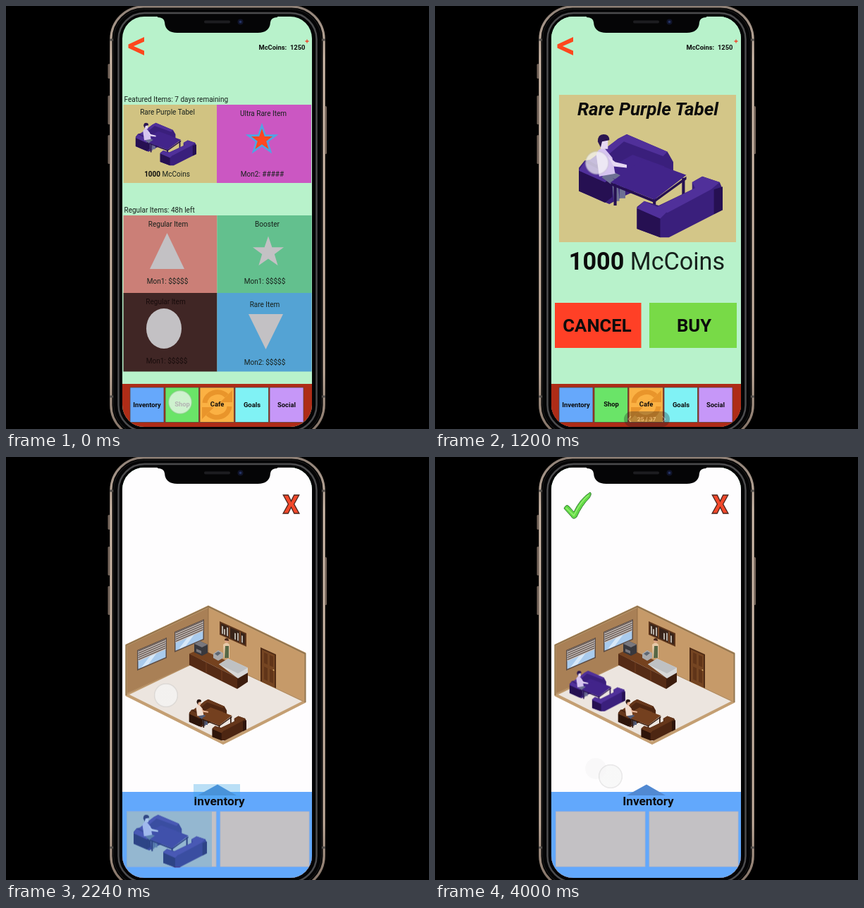
Animation, 600 px wide and 600 px high, one loop 4040 ms. Source, as an HTML page:

```html
<!DOCTYPE html>
<html lang="en">
<head>
<meta charset="utf-8">
<title>Cafe shop prototype</title>
<style>
  html, body { margin: 0; width: 100%; height: 100%; overflow: hidden; background: #000; }
  svg { display: block; width: 100vw; height: 100vh; }
  text { font-family: Roboto, "Liberation Sans", sans-serif; font-size: 10px; fill: #17211c; white-space: pre; }
  .b { font-weight: 700; fill: #0c0c0c; }
  .s { font-size: 9.4px; }
  .m { text-anchor: middle; }
  .big { font-size: 25.7px; }
  .dim text { fill: #180c0c; }
  .grey { fill: #c3c1c4; }

  .purple { --top: #42248a; --lit: #50309a; --mid: #3a1f7c; --dark: #261052; --skin: #e6d8f2; --shirt: #d6c4f0; --hair: #2b1650; --legs: #6d7093; }
  .brown { --top: #74401f; --lit: #66371b; --mid: #4d2612; --dark: #2e150a; --skin: #e8b596; --shirt: #f0ddd0; --hair: #2a1710; --legs: #4f5b78; }
  .top { fill: var(--top); } .lit { fill: var(--lit); } .mid { fill: var(--mid); } .dark { fill: var(--dark); }
  .skin { fill: var(--skin); } .shirt { fill: var(--shirt); } .hair { fill: var(--hair); }
  .legs { fill: none; stroke: var(--legs); stroke-width: 4; stroke-linejoin: round; }
  .post { fill: none; stroke: var(--dark); stroke-width: 2; }

  .a { animation: 4040ms linear infinite; }
  #popup { animation-name: popup; }
  #room { animation-name: room; }
  #stored { animation-name: stored; }
  #placed { animation-name: placed; }
  #hint { animation-name: hint; }
  #pager { animation-name: pager; }
  #touch { animation-name: touch; }
  #ghost { animation-name: ghost; }

  @keyframes popup { 0%, 26.73% { opacity: 0 } 29.7%, 100% { opacity: 1 } }
  @keyframes room { 0%, 33.66% { opacity: 0 } 37.62%, 100% { opacity: 1 } }
  @keyframes stored { 0%, 76.73% { opacity: 1 } 80.69%, 100% { opacity: 0 } }
  @keyframes placed { 0%, 76.73% { opacity: 0 } 80.69%, 100% { opacity: 1 } }
  @keyframes hint { 0%, 51.5% { opacity: 0 } 53.5%, 56.4% { opacity: .35 } 59.4%, 100% { opacity: 0 } }
  @keyframes pager { 0%, 6.93% { opacity: 0 } 8.91%, 27.7% { opacity: 1 } 30.7%, 100% { opacity: 0 } }
  @keyframes ghost { 0%, 98.02% { opacity: 0 } 98.8%, 100% { opacity: .3 } }
  @keyframes touch {
    0%, 1.98% { transform: translate(247px, 562px); animation-timing-function: ease-in-out }
    9.9%, 28.7% { transform: translate(215px, 194px); animation-timing-function: ease-in-out }
    33.17%, 37.62% { transform: translate(350px, 455px); animation-timing-function: ease-in-out }
    47.03%, 60.4% { transform: translate(227px, 338px); animation-timing-function: ease-in-out }
    68.3%, 90.1% { transform: translate(245px, 548px); animation-timing-function: ease-in-out }
    98.02% { transform: translate(228px, 442px) }
    99.01%, 100% { transform: translate(249px, 453px) }
  }
</style>
</head>
<body>
<svg viewBox="0 0 600 600">
  <defs>
    <clipPath id="screen"><rect x="165" y="15" width="269" height="582" rx="31"/></clipPath>
    <linearGradient id="metal" x2="0" y2="1">
      <stop offset="0" stop-color="#8e8076"/><stop offset=".12" stop-color="#cdb9a8"/>
      <stop offset=".85" stop-color="#bfaa99"/><stop offset="1" stop-color="#7d6d62"/>
    </linearGradient>
    <radialGradient id="dot"><stop offset=".86" stop-color="#f6f6f6" stop-opacity=".72"/><stop offset=".92" stop-color="#d8d8d8" stop-opacity=".55"/><stop offset="1" stop-color="#999" stop-opacity="0"/></radialGradient>

    <!-- two sofas, a table and a guest in a 100 by 72 box -->
    <g id="set">
      <path class="mid" d="M1 24L5 19 12 18 28 4 34 1 62 13 66 20 66 28 31 44 22 49 1 40Z"/>
      <path class="lit" d="M8 19L28 4 34 1 62 13 59 16 32 6 13 22Z"/>
      <path class="top" d="M15 28L38 15 60 23 34 37Z"/>
      <path class="dark" d="M1 26L19 34 19 48 1 40ZM19 34L24 30 24 44 19 48Z"/>
      <path class="lit" d="M1 26L5 20 24 30 19 34Z"/>
      <g transform="translate(-3 1)">
        <path class="legs" d="M23 26L34 31 34 44M21 28L29 34 30 46"/>
        <path class="shirt" d="M16 14Q17 9 22 10L27 16 29 27 18 29Z"/>
        <path class="skin" d="M24 15L29 19 37 21 37 23 28 22ZM19 3H24V10H19Z"/>
        <path class="hair" d="M17 5Q17 0 21 0 25 0 25 4L20 5 19 9Z"/>
      </g>
      <path class="post" d="M26 35V50M53 45V60M73 31V45"/>
      <path class="dark" d="M23 34L53 46 75 30 75 32 53 48 23 36Z"/>
      <path class="top" d="M23 34L45 18 75 29 53 46Z"/>
      <path class="mid" d="M41 51L46 47 56 50 79 39 79 34 86 30 98 34 100 39 100 53 63 72 57 72 41 66Z"/>
      <path class="lit" d="M53 52L81 38 79 34 86 30 98 34 92 39 62 55Z"/>
      <path class="dark" d="M41 52L57 59 57 72 41 66ZM94 39L100 37 100 53 94 56Z"/>
      <path class="lit" d="M41 52L46 47 62 54 57 59Z"/>
    </g>

    <g id="window">
      <rect width="42" height="29" fill="#5c4b42"/>
      <rect x="1.500" y="1.500" width="39" height="26" fill="#a9cbed"/>
      <path d="M6 27L22 13H31L16 27Z" fill="#d7e8f8"/>
      <rect x="1.500" y="1.500" width="39" height="15" fill="#c9c2bf"/>
      <path d="M21 1.500V16.500" stroke="#65564f" stroke-width="39" stroke-dasharray="1.500 1.500"/>
    </g>

    <g id="bar">
      <rect x="165" y="536" width="269" height="62" fill="#ae2c17"/>
      <g stroke="#5d4038" stroke-width=".8">
        <rect x="176" y="541" width="48" height="49.500" fill="#66a8fb"/>
        <rect x="226" y="541" width="47.500" height="49.500" fill="#6ae468"/>
        <rect x="275" y="541" width="48.500" height="49.500" fill="#fbb143"/>
        <rect x="325" y="541" width="47.500" height="49.500" fill="#80f2f5"/>
        <rect x="374" y="541" width="48" height="49.500" fill="#c697f8"/>
      </g>
      <path d="M282 563A18 17 0 0 1 313 553M317 568A18 17 0 0 1 286 578" fill="none" stroke="#e9952b" stroke-width="7"/>
      <path d="M321 545V562H304ZM278 586V569H295Z" fill="#e9952b"/>
      <g class="m">
        <text class="b s" x="200" y="568.500">Inventory</text><text class="b s" x="250" y="568">Shop</text>
        <text class="b s" x="299.500" y="568">Cafe</text><text class="b s" x="349" y="568.500">Goals</text>
        <text class="b s" x="398" y="568.500">Social</text>
      </g>
    </g>

    <g id="head">
      <rect x="165" y="15" width="269" height="583" fill="#b8f2cb"/>
      <path d="M196 44L173.500 54.500V59.500L196 70V63.500L181 57 196 50.500Z" fill="#ff471d"/>
      <path d="M424.500 50H429.500M427 47.500V52.500" stroke="#f1432a" stroke-width="1.300"/>
    </g>
    <path id="star" d="M0-23L5.400-7.300H22L8.800 2.500 13.600 18.500 0 9-13.600 18.500-8.800 2.500-22-7.300H-5.400Z"/>
  </defs>

  <rect width="600" height="600"/>

  <!-- phone body -->
  <g fill="#75655a">
    <rect x="144.500" y="82" width="3" height="21" rx="1.500"/><rect x="144.500" y="127" width="3" height="41" rx="1.500"/>
    <rect x="144.500" y="183" width="3" height="41" rx="1.500"/><rect x="452" y="142" width="3" height="68" rx="1.500"/>
  </g>
  <rect x="147" y="-1" width="306" height="615" rx="48" fill="#4f463f"/>
  <rect x="149" y="1" width="302" height="611" rx="46" fill="#050505" stroke="url(#metal)" stroke-width="3"/>
  <rect x="152.500" y="4.500" width="295" height="604" rx="43" fill="#050506" stroke="#1e1d1d"/>
  <rect x="159.500" y="10" width="281" height="593" rx="37" fill="#050506" stroke="#4b4b4d" stroke-width="2.500"/>
  <path d="M147 48H152M448 48H453M147 554H152M448 554H453" stroke="#55504c" stroke-width="3"/>

  <g clip-path="url(#screen)">
    <g id="shop">
      <use href="#head"/>
      <text class="b s" x="358.500" y="62">McCoins:  1250</text>
      <text x="167.500" y="136">Featured Items: 7 days remaining</text>
      <text x="167.500" y="293">Regular Items: 48h left</text>
      <rect x="166.500" y="140" width="133" height="111" fill="#d1c382"/>
      <rect x="299" y="140" width="134" height="111" fill="#cb57c2"/>
      <rect x="166.500" y="297" width="133" height="110.500" fill="#cb7f77"/>
      <rect x="299.500" y="297" width="134" height="110.500" fill="#63c08e"/>
      <rect x="166.500" y="407" width="133" height="111.500" fill="#402625"/>
      <rect x="299.500" y="407" width="134" height="111.500" fill="#54a3d4"/>
      <use href="#set" class="purple" transform="translate(183 165) scale(.87 .85)"/>
      <use href="#star" transform="translate(363 190) scale(.88)" fill="#ff4720" stroke="#4fa5e4" stroke-width="3"/>
      <g class="grey">
        <path d="M228.500 322L253 373H204ZM344 437H393L368.500 487Z"/>
        <use href="#star" x="372" y="349.500"/>
        <ellipse cx="224" cy="457.500" rx="25" ry="28.500"/>
      </g>
      <g class="m">
        <text x="229" y="153.500">Rare Purple Tabel</text><text x="365" y="155.500">Ultra Rare Item</text>
        <text x="228.500" y="241.500"><tspan class="b">1000</tspan> McCoins</text><text x="363.500" y="241.500">Mon2: #####</text>
        <text x="230" y="312.500">Regular Item</text><text x="370.500" y="312.500">Booster</text>
        <text x="229" y="393.500">Mon1: $$$$$</text><text x="367" y="393.500">Mon1: $$$$$</text>
        <text x="367" y="426.500">Rare Item</text><text x="367" y="508.500">Mon2: $$$$$</text>
        <g class="dim"><text x="226.500" y="423">Regular Item</text><text x="228" y="506.500">Mon1: $$$$$</text></g>
      </g>
      <use href="#bar"/>
    </g>

    <g id="popup" class="a">
      <use href="#head"/>
      <text class="b s" x="356.500" y="62">McCoins:  1250</text>
      <rect x="176" y="126" width="251" height="209" fill="#d3c688"/>
      <text class="b m" x="302" y="155" style="font-size:26px;font-style:italic">Rare Purple Tabel</text>
      <use href="#set" class="purple" transform="translate(202 180) scale(2.06)"/>
      <text class="m" x="300.500" y="374" style="font-size:34.2px"><tspan class="b">1000</tspan> McCoins</text>
      <rect x="170" y="421" width="122.500" height="64" fill="#ff4026"/>
      <rect x="304" y="421" width="124" height="64" fill="#78da47"/>
      <text class="b m big" x="230" y="462">CANCEL</text>
      <text class="b m big" x="367.500" y="462">BUY</text>
      <use href="#bar"/>
    </g>

    <g id="room" class="a">
      <rect x="165" y="15" width="269" height="583" fill="#fefdfe"/>
      <text class="m" x="404.500" y="80" style="font-size:36px;font-weight:800;fill:#f2482a;stroke:#49251d;stroke-width:1.3px">X</text>

      <!-- walls and floor -->
      <path d="M287 210.500L425 277.500V348.500L308 408 169.500 339V266Z" fill="#c49f73"/>
      <path d="M287 214L172 268V335L287 283Z" fill="#a98056"/>
      <path d="M287 214L423 280V346L287 283Z" fill="#c69a69"/>
      <path d="M287 283L420 346.500 308 403 175 337Z" fill="#ece5df"/>
      <path d="M172 336L287 283 423 347" fill="none" stroke="#b08a60"/>
      <path d="M287 211V283" stroke="#8d683f" stroke-width=".8"/>
      <path d="M170.500 338V267L287 212 424.500 279V348" fill="none" stroke="#94764f" stroke-width="2"/>
      <use href="#window" transform="matrix(1 -.43 0 1 186 274)"/>
      <use href="#window" transform="matrix(1 -.43 0 1 239 248)"/>
      <g transform="matrix(1 .45 0 1 303 233)">
        <rect width="38" height="19" fill="#5d351b"/><rect x="2" y="2" width="34" height="15" fill="#38241a"/>
        <path d="M4 16V5M7 16V8M11 16V4M22 16V7M26 16V5M32 16V6" stroke="#c8c2b9" stroke-width="1.800"/>
        <path d="M14 2V17M29 2V17" stroke="#7b4a28" stroke-width="2"/>
      </g>
      <g transform="matrix(1 .45 0 1 361 270)">
        <rect width="22" height="48" fill="#4f2b15"/><rect x="2" y="2" width="18" height="46" fill="#754522"/>
        <path d="M5 5H10V20H5ZM13 5H18V20H13ZM5 25H10V43H5ZM13 25H18V43H13Z" fill="#613519"/>
        <circle cx="18.500" cy="24" r="1" fill="#d8b26d"/>
      </g>

      <!-- barista and counter -->
      <path d="M308 266Q313 261 317 266L317 285H309Z" fill="#e6c9a8"/>
      <path d="M311 268H316V285H310Z" fill="#566745"/>
      <circle cx="313" cy="261" r="2.800" fill="#dda583"/>
      <path d="M310 260Q310 257 313 257 316 257 316 261Z" fill="#47271a"/>
      <path d="M260 279L276 272 343 303 328 313Z" fill="#75421f"/>
      <path d="M260 279L328 313V329L260 295Z" fill="#552b15"/>
      <path d="M328 313L343 304V319L328 329Z" fill="#3c1d0e"/>
      <path d="M284 291V306M306 302V317" stroke="#733e20"/>
      <path d="M302 294L315 286 343 299V306L329 314Z" fill="#d8d8d8"/>
      <path d="M302 294L315 286 343 299 329 307Z" fill="#bfc1c3"/>
      <path d="M267 265L275 261 286 266V278L278 282 267 277Z" fill="#38383d"/>
      <path d="M267 265L275 261 286 266 278 270ZM270 272L277 275V279L270 276Z" fill="#78777d"/>
      <path d="M294 279L301 274 308 278V285L301 289 294 285Z" fill="#aaa9aa"/>
      <path d="M296 279L301 276 305 278 300 282Z" fill="#5d6773"/>

      <use href="#set" class="brown" transform="translate(259 343) scale(.82)"/>

      <!-- inventory drawer -->
      <rect x="165" y="475" width="269" height="123" fill="#62a8fc"/>
      <path d="M272 480L300 464.500 327 480Z" fill="#5189d2"/>
      <text class="b m" x="302.500" y="494" style="font-size:17.2px">Inventory</text>
      <g class="grey" stroke="#b3b4c3" stroke-width=".8">
        <rect x="171.500" y="503" width="126.500" height="78"/><rect x="304" y="503" width="126" height="78"/>
      </g>
      <g id="stored" class="a"><use href="#set" class="purple" transform="translate(180 506.500) scale(1.05)"/></g>
      <g id="hint" class="a" fill="#3ea5e8">
        <rect x="266" y="464" width="66" height="21"/><rect x="171" y="503" width="121" height="78"/>
      </g>
      <g id="placed" class="a">
        <use href="#set" class="purple" transform="translate(190 302.500) scale(.8 .81)"/>
        <path d="M183 73Q186 66 190 70L197 78Q205 60 220 50 223 52 219 58 208 69 201 85 196 90 193 84Z" fill="#62d946" stroke="#357b36"/>
        <path d="M186 72L197 83Q206 64 218 54" fill="none" stroke="#98f073" stroke-width="1.500"/>
      </g>
    </g>
  </g>

  <!-- notch -->
  <path d="M215 14V16Q224 16 225 23 226 38 243 38H357Q374 38 375 23 376 16 385 16V14Z" fill="#050506"/>
  <rect x="281" y="20.500" width="37" height="4" rx="2" fill="#1d1d20"/>
  <circle cx="332.500" cy="22.500" r="4" fill="#10142a"/><circle cx="332.500" cy="22.500" r="1.800" fill="#253465"/>

  <g id="pager" class="a">
    <rect x="268" y="575" width="65" height="22" rx="11" fill="#202022" fill-opacity=".95"/>
    <path d="M278 582L274 586 278 590M322.500 582L326.500 586 322.500 590" fill="none" stroke="#c7c7c7" stroke-width="1.200"/>
    <text class="m" x="300" y="589" style="font:600 8px Inter,Roboto,sans-serif;fill:#e5e5e5">25 / 37</text>
  </g>

  <circle id="ghost" class="a" cx="228" cy="442" r="15" fill="#eee"/>
  <g id="touch" class="a"><circle r="17.500" fill="url(#dot)"/></g>
</svg>
</body>
</html>
```
